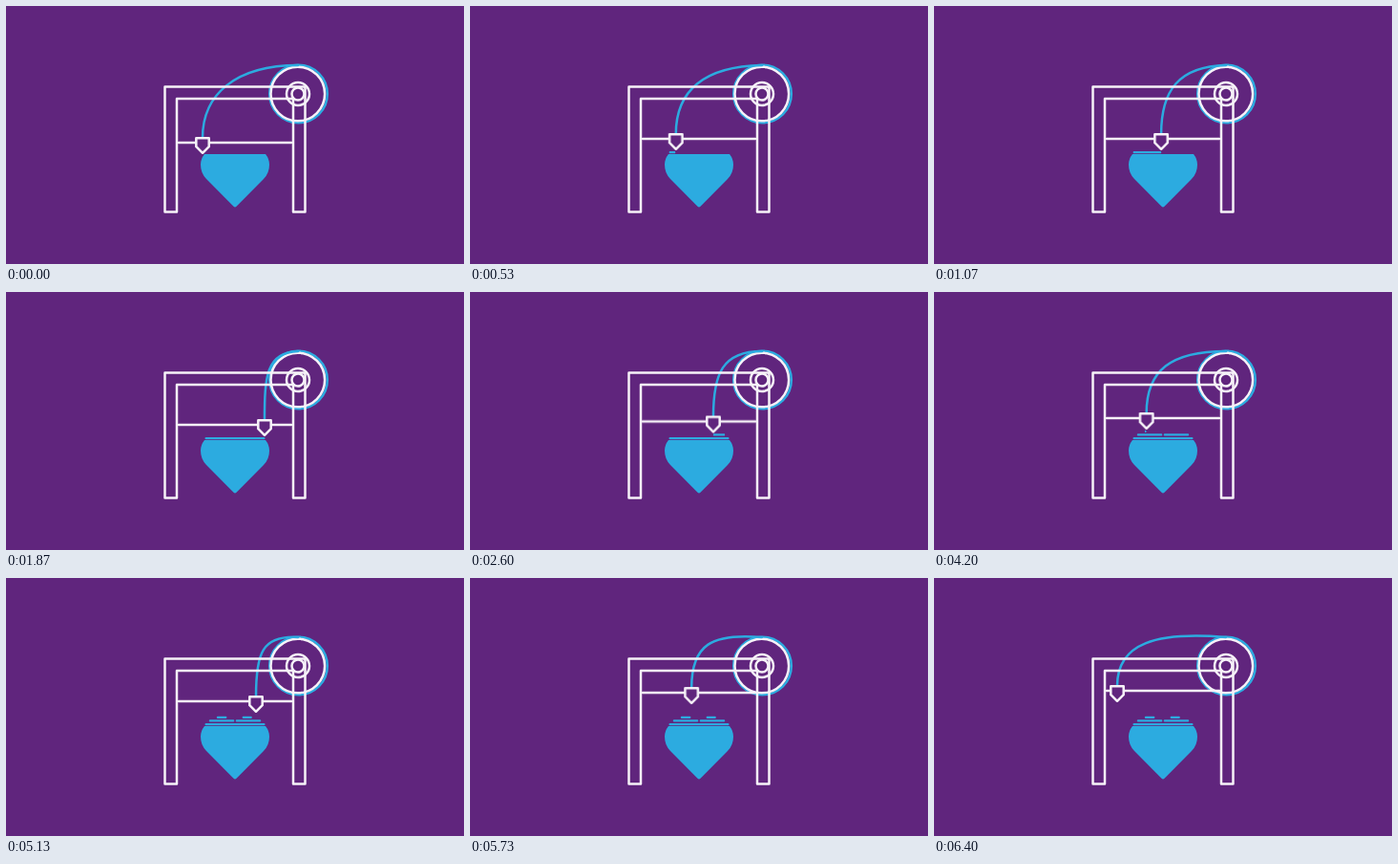
An HTML page without scripts that plays this animation: 480x270 px, repeating every 7.07 s.

```html
<!DOCTYPE html>
<html lang="en">
<head>
<meta charset="utf-8">
<title>3D printer</title>
<style>
  :root { --purple: #60257d; --blue: #2cabe0; --white: #f6f2f8; --loop: 7.07s linear infinite; }
  html, body { margin: 0; width: 100%; height: 100%; overflow: hidden; background: var(--purple); }
  svg { display: block; width: 100%; height: 100%; }
  .line { fill: none; stroke: var(--white); stroke-width: 2.5; stroke-linejoin: round; stroke-linecap: round; }
  .blue { stroke: var(--blue); }
  .body { fill: var(--purple); }
  .print { fill: var(--blue); }

  .thread { animation: thread var(--loop); }
  .bar { animation: lift var(--loop); }
  .nozzle { animation: travel var(--loop); }
  .layer { transform-box: fill-box; transform-origin: left; animation: var(--loop); }
  .back { transform-origin: right; }
  .base-layer { animation-name: base-layer; }
  .right-lobe { animation-name: right-lobe; }
  .left-lobe { animation-name: left-lobe; }
  .left-tip { animation-name: left-tip; }
  .right-tip { animation-name: right-tip; }

  /* The carriage steps up one layer between passes, then parks top left. */
  @keyframes lift {
    0% { transform: translateY(143px); }
    5.19%, 26.41% { transform: translateY(139px); }
    32.07%, 53.28% { transform: translateY(135.5px); }
    58.94%, 69.31% { transform: translateY(132px); }
    72.56%, 73.55% { transform: translateY(129px); }
    77.79% { transform: translateY(124px); }
    82.74%, 100% { transform: translateY(118px); }
  }
  @keyframes travel {
    0% { transform: translateX(206px); }
    5.19% { transform: translateX(209px); }
    26.41% { transform: translateX(271px); }
    32.07% { transform: translateX(267px); }
    53.28% { transform: translateX(213px); }
    58.94% { transform: translateX(221px); }
    69.31% { transform: translateX(257px); }
    72.56%, 73.55% { transform: translateX(262px); }
    77.79% { transform: translateX(252px); }
    82.74% { transform: translateX(222px); }
    86.28% { transform: translateX(201px); }
    90.52%, 100% { transform: translateX(192px); }
  }
  @keyframes thread {
    0% { d: path("M206 138C206 93 240 62 306 62"); }
    5.19% { d: path("M209 134C209 89 241.5 63 306 62"); }
    26.41% { d: path("M271 134C271 89 272.5 63 306 62"); }
    32.07% { d: path("M267 130.5C267 85.5 270.5 62 306 62"); }
    53.28% { d: path("M213 130.5C213 85.5 243.5 62 306 62"); }
    58.94% { d: path("M221 127C221 82 247.5 62 306 62"); }
    69.31% { d: path("M257 127C257 82 265.5 61 306 62"); }
    72.56%, 73.55% { d: path("M262 124C262 79 268 60 306 62"); }
    77.79% { d: path("M252 119C252 74 263 58 306 62"); }
    82.74% { d: path("M222 113C222 68 248 57 306 62"); }
    86.28% { d: path("M201 113C201 68 237.5 56 306 62"); }
    90.52%, 100% { d: path("M192 113C192 68 233 56 306 62"); }
  }

  @keyframes base-layer { 0%, 5.19% { transform: scaleX(0); } 26.41%, 100% { transform: none; } }
  @keyframes right-lobe { 0%, 32.07% { transform: scaleX(0); } 42.29%, 100% { transform: none; } }
  @keyframes left-lobe { 0%, 43.07% { transform: scaleX(0); } 53.28%, 100% { transform: none; } }
  @keyframes left-tip { 0%, 58.94% { transform: scaleX(0); } 61.81%, 100% { transform: none; } }
  @keyframes right-tip { 0%, 66.72% { transform: scaleX(0); } 69.31%, 100% { transform: none; } }
</style>
</head>
<body>
<svg viewBox="0 0 480 270">
  <g class="print">
    <path d="M208 155H272Q276 160 276 166Q276 175 270 181L241.5 209.7Q240 211.2 238.5 209.7L210 181Q204 175 204 166Q204 160 208 155Z"/>
    <rect class="layer base-layer" x="208.5" y="151.9" width="63" height="2.3" rx="1"/>
    <rect class="layer back right-lobe" x="240.7" y="148.3" width="26.5" height="2.3" rx="1"/>
    <rect class="layer back left-lobe" x="212.8" y="148.3" width="26.5" height="2.3" rx="1"/>
    <rect class="layer left-tip" x="220.8" y="144.7" width="10.6" height="2.3" rx="1"/>
    <rect class="layer right-tip" x="247.6" y="144.7" width="10.2" height="2.3" rx="1"/>
  </g>

  <circle class="line blue" cx="306.5" cy="92" r="30.3"/>
  <circle class="line" cx="305.8" cy="92" r="28.3"/>
  <circle class="line" cx="306" cy="92" r="12"/>
  <circle class="line" cx="306" cy="92" r="6.5"/>
  <path class="line blue thread" d="M206 138C206 93 240 62 306 62"/>

  <path class="line" d="M166.5 84.5H313.5V215.5H301V97H179V215.5H166.5Z"/>
  <g class="bar">
    <path class="line" d="M181 0H299"/>
    <path class="line body nozzle" d="M-6.7 -4.8H6.7V4.2L0 10.8L-6.7 4.2Z"/>
  </g>
</svg>
</body>
</html>
```
